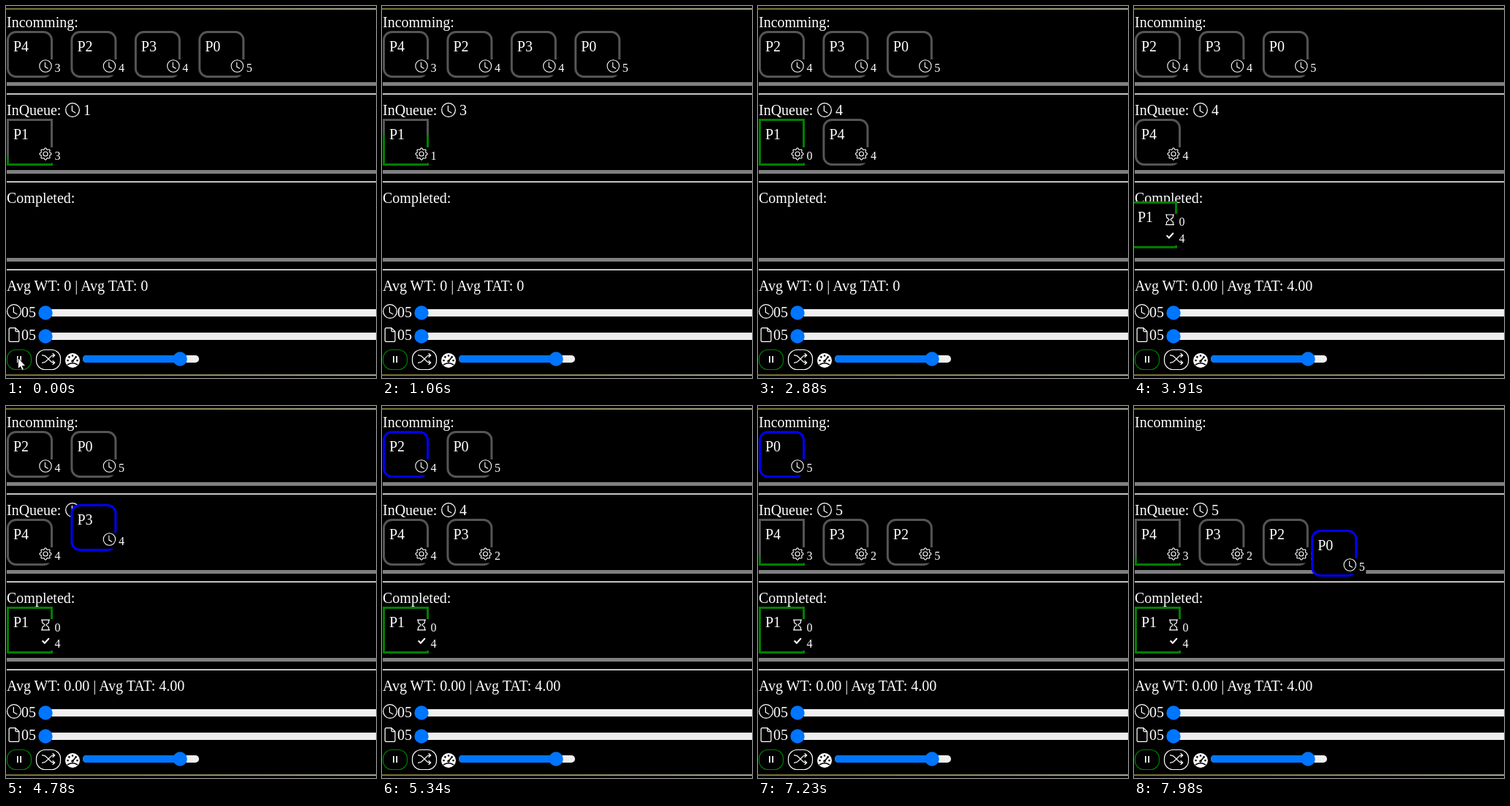
These frames come from a looping animation (506x508 px, 8000 ms). An HTML page:

```html
<!DOCTYPE html>
<html lang="en">
<head>
<meta charset="utf-8">
<title>Scheduler</title>
<style>
html, body { margin: 0; width: 100%; height: 100%; overflow: hidden; background: #000; }
svg { display: block; width: 506px; height: 508px; }
text { font: 20px "Liberation Serif", "Times New Roman", serif; fill: #fff; white-space: pre; }
.num { font-size: 16px; }
.icon { fill: none; stroke: #fff; }
</style>
</head>
<body>
<svg viewBox="0 0 506 508">
  <defs>
    <linearGradient id="edge"><stop stop-color="#76733a"/><stop offset="1" stop-color="#a9a78c"/></linearGradient>
    <clipPath id="queueClip"><path d="M0 154H506V224H0z"/></clipPath>
    <g id="clock" class="icon"><circle r="7.5"/><path d="M-.5-4.5V1L3 3" stroke-linecap="round"/></g>
    <g id="gear" class="icon"><circle r="2.75"/><path id="cog"/></g>
    <g id="hourglass" class="icon" stroke-width="1.2"><path d="M-6-6.8H6M-6 6.8H6M-4.5-6.5V-4C-4.5-1.5-1-1.5-1 0S-4.5 1.5-4.5 4V6.5M4.5-6.5V-4C4.5-1.5 1-1.5 1 0S4.5 1.5 4.5 4V6.5"/></g>
    <g id="check" class="icon" stroke-width="1.8"><path d="M-3.5 0L-1 2.5L4-3" stroke-linecap="round"/></g>
    <g id="file" class="icon"><path d="M1.5-7.5H-4Q-5.5-7.5-5.5-6V6Q-5.5 7.5-4 7.5H4Q5.5 7.5 5.5 6V-3.5zV-5Q1.5-3.5 3-3.5H5.5"/></g>
    <g id="shuffle" class="icon" stroke-width="1.1"><path id="strand" d="M-8-4.5H-7C-3-4.5-2.5-2 0 0S3 4.5 6 4.5H7.5M5 2L7.7 4.5L5 7"/><use href="#strand" transform="scale(1 -1)"/></g>
  </defs>
  <g id="panel"></g>
  <g id="live"></g>
</svg>
<script>
const LOOP = 8000, STEP = 70, MOVE = 630, GREY = '#555';
const ROW = { in: 34, queue: 154, done: 274 };
const $ = id => document.getElementById(id);

// In order of entering the list; blue: picked, go: starts to move
const procs = [
  { name: 'P4', arrive: 3, burst: 4, blue: 1650, go: 2250 },
  { name: 'P2', arrive: 4, burst: 5, blue: 5340, go: 6000 },
  { name: 'P3', arrive: 4, burst: 2, blue: 4120, go: 4710 },
  { name: 'P0', arrive: 5, burst: 5, blue: 7230, go: 7840 }
];
const byMove = [...procs].sort((a, b) => a.go - b.go);
const DONE = 3490;
const ticks = [460, 1060, 2880, 6630];

// Damped drop: vertical offset from the landing place at each step
const drop = [-120, -67, -20, 15, 32, 18, -4, -12, -8, -3, 0];
const glide = [0, 0, .6, .92];

const slot = i => 1 + 87.4 * i;
const text = (x, y, s, cls = '') => `<text x="${x}" y="${y}" class="${cls}">${s}</text>`;
const rect = (x, y, w, h, fill, rx = 0) => `<rect x="${x}" y="${y}" width="${w}" height="${h}" rx="${rx}" fill="${fill}"/>`;
const icon = (id, x, y, size) => `<use href="#${id}" transform="translate(${x} ${y}) scale(${size / 16})"/>`;
const dot = (x, y, r, fill) => `<circle cx="${x}" cy="${y}" r="${r}" fill="${fill}"/>`;

const frame = (stroke, rx) =>
  `<rect x="1.5" y="1.5" width="60" height="61" rx="${rx}" stroke="${stroke}" stroke-width="3"/>`;

function box(x, y, name, border, inner) {
  return `<g transform="translate(${x} ${y})">${border}${text(9, 28, name)}${inner}</g>`;
}

const badge = (id, n) => rect(44, 39, 31, 21.5, '#000') + icon(id, 53, 48, 17.5) + text(65.5, 56, n, 'num');

const waiting = (p, x, y, color) => box(x, y, p.name, frame(color, 11), badge('clock', p.arrive));

function queued(name, x, left, total) {
  const f = 1 - left / total;
  if (!f) return box(x, ROW.queue, name, frame(GREY, 11), badge('gear', left));
  const fade = `<linearGradient id="fill${name}" x1="0" y1="1" x2="0" y2="0">
    <stop offset="${f - .15}" stop-color="green"/><stop offset="${f}" stop-color="${GREY}"/></linearGradient>`;
  const border = f < 1 ? fade + frame(`url(#fill${name})`, 0) : frame('green', 0);
  return box(x, ROW.queue, name, border, badge('gear', left));
}

const finished = (x, y) => box(x, y, 'P1', frame('green', 0),
  rect(44, 17, 31, 43, '#000') + icon('hourglass', 53, 25, 16) + text(65.5, 33.5, 0, 'num') +
  icon('check', 53, 47, 17.5) + text(65.5, 56, 4, 'num'));

function slider(x, y, end, knob, filled) {
  return rect(x, y - 5, end - x, 10, '#efefef', 5) +
    (filled ? rect(x, y - 5, knob - x, 10, '#0075ff', 5) : '') + dot(knob, y, 9.7, '#0075ff');
}

function panel() {
  let s = rect(0, 3, 506, 2, 'url(#edge)') + rect(0, 503, 506, 2, 'url(#edge)');
  for (const y of [104, 224, 344])
    s += rect(1, y, 505, 5, '#808080') + rect(1, y + 15, 505, 1, '#9a9a9a') + rect(1, y + 16, 505, 1, '#eee');
  s += text(1, 29, 'Incomming:') + text(1, 149, 'InQueue:') + text(1, 269, 'Completed:') + icon('clock', 91, 142, 20);
  s += icon('clock', 11, 417, 20) + text(21, 425, '05') + slider(45, 419, 530, 54);
  s += icon('file', 11, 449, 20) + text(21, 456, '05') + slider(45, 451, 530, 54);
  const pill = (x, c) => `<rect x="${x}" y="469.5" width="33" height="27" rx="12" fill="none" stroke="${c}" stroke-width="1.2"/>`;
  s += pill(1.5, 'green') + rect(15, 478, 1.7, 9, '#fff') + rect(19.3, 478, 1.7, 9, '#fff');
  s += pill(41.5, '#fff') + icon('shuffle', 58, 482, 18);
  s += dot(91, 484, 10, '#fff');
  for (let a = 180; a <= 360; a += 45) {
    const r = a * Math.PI / 180;
    s += dot(91 + 6.5 * Math.cos(r), 484 + 6.5 * Math.sin(r), 1.3, '#000');
  }
  s += '<path d="M91 485L96 479M84 490Q91 485.5 98 490" fill="none" stroke="#000" stroke-width="1.7"/>' + dot(91, 485, 1.8, '#000');
  return s + slider(105, 482, 264, 238, true);
}

function live(t) {
  const clock = 1 + ticks.filter(x => t >= x).length;
  const incoming = procs.filter(p => t < p.go);
  let s = incoming.map((p, i) => waiting(p, slot(i), ROW.in, t >= p.blue ? '#00f' : GREY)).join('');
  s += text(106, 149, clock);
  s += text(1, 389, t < DONE ? 'Avg WT: 0 | Avg TAT: 0' : 'Avg WT: 0.00 | Avg TAT: 4.00');

  if (t < DONE) s += queued('P1', slot(0), 4 - clock, 4);
  let place = t < DONE ? 1 : 0;
  for (const p of byMove.filter(p => t >= p.go)) {
    const x = slot(place++), k = Math.floor((t - p.go) / STEP) + 1;
    if (t >= p.go + MOVE) {
      s += queued(p.name, x, p.burst - (p.name === 'P4' && clock > 4), p.burst);
      continue;
    }
    const from = slot(procs.filter(q => q.go >= p.go).indexOf(p));
    const moving = waiting(p, from + (x - from) * (glide[k] ?? 1), ROW.queue + drop[k], '#00f');
    s += k > 4 ? `<g clip-path="url(#queueClip)">${moving}</g>` : moving;
  }

  if (t >= DONE) {
    const k = Math.floor((t - DONE) / STEP) + 1, landed = t >= DONE + MOVE;
    s += landed ? finished(1, ROW.done)
      : finished(1 - 5 * Math.sin(Math.PI * k / 14), ROW.done + drop[k] * (k > 5 ? .6 : 1));
  }
  if (t < 130)
    s += '<path d="M16.5 480.5V495.5L19.8 492.3L22 497.5L24.5 496.5L22.3 491.5H26.8z" fill="#fff" stroke="#000" stroke-width=".8"/>';
  return s;
}

let cog = '';
for (let a = 0; a < 360; a += 5) {
  const r = a * Math.PI / 180, d = 6.5 + .9 * Math.cos(8 * r);
  cog += `${a ? 'L' : 'M'}${(d * Math.sin(r)).toFixed(2)} ${(-d * Math.cos(r)).toFixed(2)}`;
}
$('cog').setAttribute('d', cog + 'z');
$('panel').innerHTML = panel();

let shown = '';
const start = performance.now();
function draw(now) {
  const next = live(Math.max(0, now - start) % LOOP);
  if (next !== shown) $('live').innerHTML = shown = next;
  requestAnimationFrame(draw);
}
draw(start);
</script>
</body>
</html>
```
